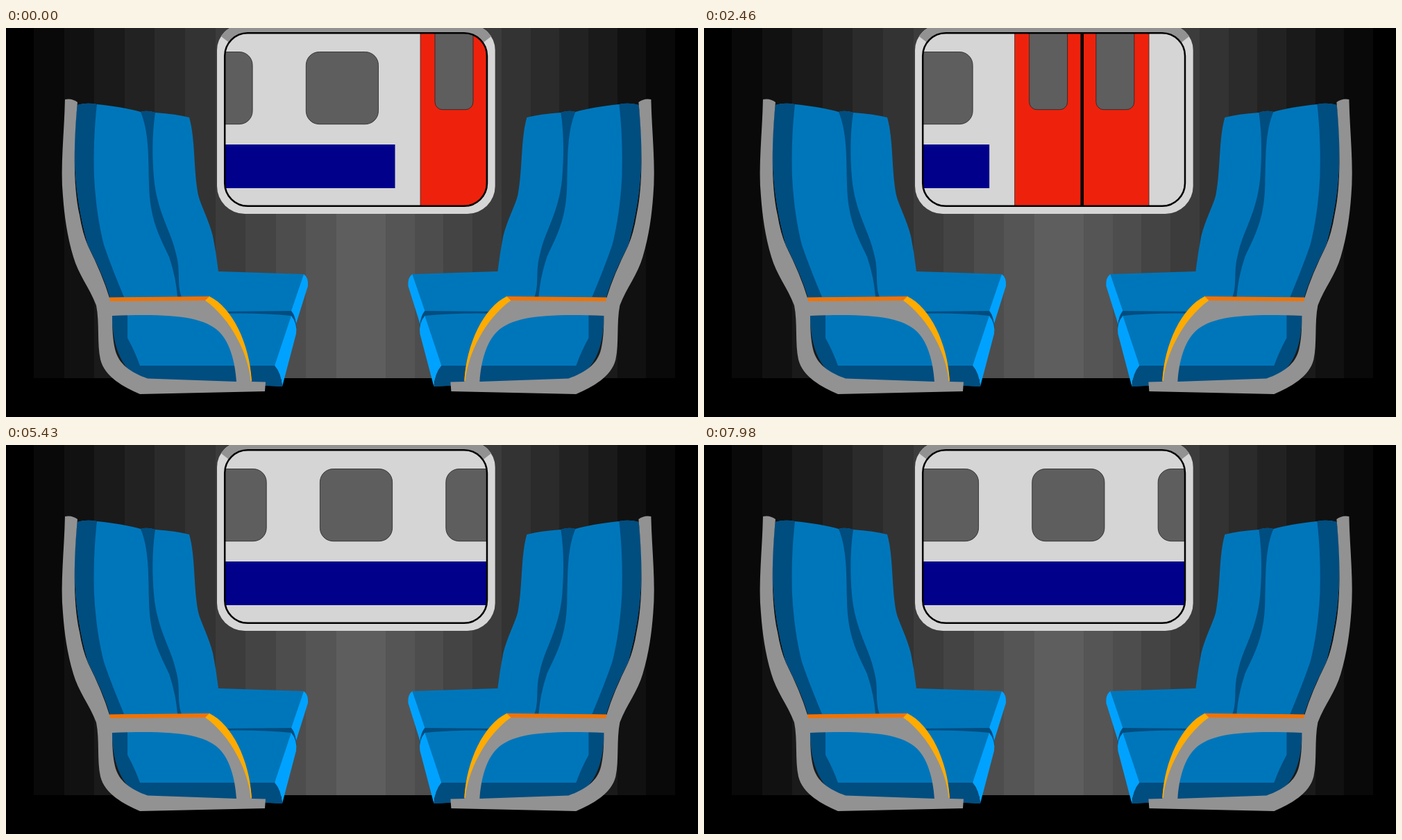
An HTML page with a canvas that plays this animation: 997x561 px, repeating every 8000 ms.

```html
<!DOCTYPE html>
<html lang="en">
<head>
<meta charset="utf-8">
<title>Train compartment</title>
<style>
html, body { margin: 0; width: 100%; height: 100%; overflow: hidden; background: #000; }
canvas { display: block; }
</style>
</head>
<body>
<canvas id="stage" width="997" height="561"></canvas>
<script>
const ctx = document.getElementById('stage').getContext('2d');

const LOOP = 8000, STEP = 30;
const RIDE = 13500, DISTANCE = 2215;   // the ride outlasts the loop
const PITCH = 181.4;                   // distance between carriage windows
const MIRROR = 1014.4;

const BLUE = '#0076ba', NAVY = '#004d80', SKY = '#00a2ff', GREY = '#929292';
const PALE = '#d5d5d5', RED = '#ee220c', GLASS = '#5e5e5e', STRIPE = '#00008b';

// Seat parts, back to front
const SEAT = [
  [BLUE, 'M103 111 Q116 107 131 110 Q170 114 194 121 Q204 118 215 122 Q245 124 264 129 C273 160 270 205 277 241 C281 257 292 276 298 300 Q303 325 306 351 L429 355 L411 410 L417 420 L387 487 L398 517 L200 506 Q155 490 153 415 L150 388 Q142 360 118 313 C95 230 97 170 103 111Z'],
  [NAVY, 'M103 111 Q116 107 131 110 C127 145 126 180 127 215 Q130 270 141 313 Q152 345 170 388 L150 390 Q142 360 118 313 C95 230 97 170 103 111Z'],
  [NAVY, 'M194 121 Q204 118 215 122 C210 155 211 190 213 215 C217 265 239 295 245 326 C252 350 246 370 253 388 L247 388 Q245 360 235 330 C220 298 207 275 206 225 C205 185 206 150 194 121Z'],
  [NAVY, 'M300 409 L411 408 Q418 417 418.500 434 L411 415 Q365 410 300 412Z'],
  [SKY, 'M429 355 Q436 360 435 372 L417.500 428 Q417 415 411 408Z'],
  [NAVY, 'M411 408 Q418 417 418.500 434 L411 415Z'],
  [SKY, 'M411 415 Q420 426 418 441 L398 517 Q396 497 387 487Z'],
  [NAVY, 'M153 413 H175 V447 Q186 467 193 487 H387 Q396 497 398 517 L200 508 Q153 490 153 413Z'],
  [GREY, 'M85 103 Q95 101 103 107 C98 160 96 225 106 270 Q110 295 118 314 Q139 356 149 389 L290 388 C325 400 350 455 354 510 L374 510.500 L373 524 L193 528 C170 518 142 503 136 478 C131 455 135 425 130 400 C120 374 104 355 97 330 C88 300 84 270 82 242 C78 200 84 150 85 103Z M153 415 C153 435 154 450 157 463 C162 485 180 497 204 505.500 L332 510 C330 480 322 452 306 437 C282 416 240 412 153 415Z'],
  ['#f27200', 'M149 388.500 L294 387 L287 393 L150 394Z'],
  ['#ffab00', 'M293 387 C326 403 351 455 354 509 L352.500 509 C350 473 325 420 287 393Z']
].map(([color, d]) => [color, new Path2D(d)]);

function rect(color, x, y, w, h) {
  ctx.fillStyle = color;
  ctx.fillRect(x, y, w, h);
}

function rounded(x, y, w, h, r) {
  ctx.beginPath();
  ctx.roundRect(x, y, w, h, r);
}

function pane(x, y, w, h, r) {
  rounded(x, y, w, h, r);
  ctx.fillStyle = GLASS;
  ctx.fill();
  ctx.strokeStyle = '#222';
  ctx.lineWidth = 0.8;
  ctx.stroke();
}

function drawWall() {
  rect('#000', 0, 0, 997, 561);
  for (let k = 0; k <= 10; k++) {
    const v = Math.round(94 * (k + 1) / 11);
    const left = Math.round(40 + 43.6 * k), right = Math.round(964 - 41.7 * k);
    rect(`rgb(${v},${v},${v})`, left, 0, right - left, 505);
  }
}

function drawSeat() {
  for (const [color, path] of SEAT) {
    ctx.fillStyle = color;
    ctx.fill(path, 'evenodd');
  }
}

// Cubic ease-in-out with handles at .42 and .58
function ease(x) {
  let lo = 0, hi = 1;
  for (let i = 0; i < 30; i++) {
    const u = (lo + hi) / 2;
    if (u * (1.26 + u * (0.52 * u - 0.78)) < x) lo = u; else hi = u;
  }
  return lo * lo * (3 - 2 * lo);
}

function drawTrain(shift) {
  ctx.save();
  ctx.translate(-shift, 0);
  rect(PALE, shift + 300, 0, 410, 270);

  // first carriage
  rect(STRIPE, 0, 168, 560.5, 63);
  for (const x of [432.3 - PITCH, 432.3]) pane(x, 34.5, 104.2, 104.2, 19);
  rect(RED, 597, 0, 193.5, 270);
  rect('#333', 596.6, 0, 0.8, 270);
  rect('#333', 790, 0, 0.8, 270);
  for (const x of [618, 714.2]) pane(x, -40, 55, 157.7, 11);
  rect('#000', 691.8, 0, 4.6, 270);

  // coupling and second carriage
  rect('#1c1c1c', 847.5, 0, 36.7, 270);
  rect('#1c1c1c', 846.7, 231, 1, 40);
  rect(STRIPE, 884, 168, 2000, 63);
  for (let i = 0; i < 8; i++) pane(1014 + PITCH * i, 34.5, 104.2, 104.2, 19);
  ctx.restore();
}

function drawWindow(shift) {
  rounded(304, -5, 400.7, 273, [37, 37, 40, 40]);
  ctx.fillStyle = '#d6d6d6';
  ctx.fill();
  ctx.save();
  ctx.clip();
  ctx.fillStyle = GREY;
  ctx.fill(new Path2D('M300 4.500 L322 21.500 H687 L709 4.500 V-10 H300Z'));
  ctx.restore();

  ctx.save();
  rounded(315.2, 7.2, 377.8, 249.6, 33);
  ctx.clip();
  drawTrain(shift);
  ctx.restore();
  rounded(315.2, 7.2, 377.8, 249.6, 33);
  ctx.strokeStyle = '#000';
  ctx.lineWidth = 2.5;
  ctx.stroke();
}

function draw(t) {
  drawWall();
  drawWindow(DISTANCE * ease(t / RIDE));
  drawSeat();
  ctx.save();
  ctx.translate(MIRROR, 0);
  ctx.scale(-1, 1);
  drawSeat();
  ctx.restore();
}

let start;
function tick(now) {
  start ??= now;
  const t = (now - start) % LOOP;
  draw(Math.floor(t / STEP) * STEP);
  requestAnimationFrame(tick);
}
draw(0);
requestAnimationFrame(tick);
</script>
</body>
</html>
```
